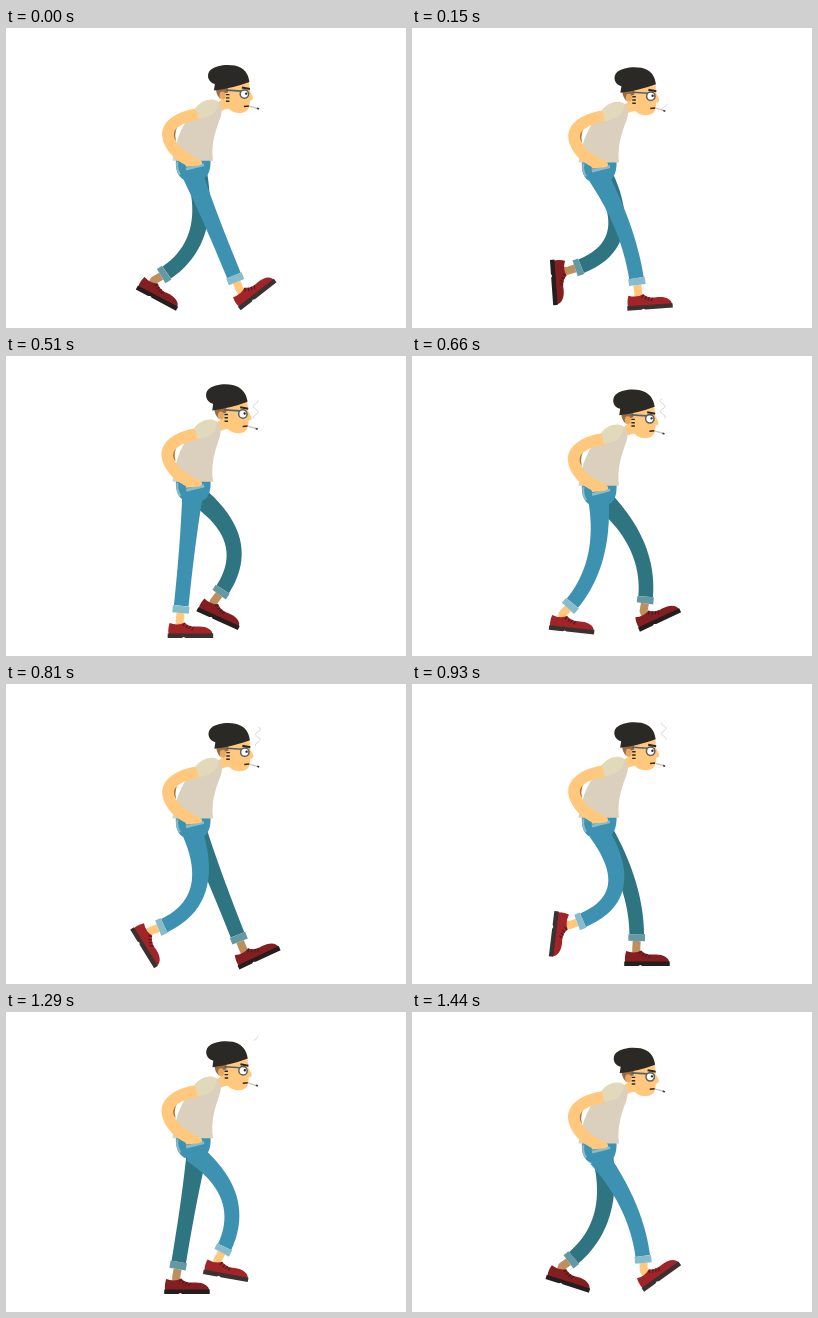
An HTML page for the animation above (1.47 s loop, 400 by 300 pixels).

```html
<!DOCTYPE html>
<html lang="en">
<head>
<meta charset="utf-8">
<title>Walk cycle</title>
<style>
  html, body { margin: 0; width: 100%; height: 100%; overflow: hidden; background: #fff; }
  svg { display: block; width: 100vw; height: 100vh; }
</style>
</head>
<body>
<svg viewBox="0 0 400 300">
  <defs>
    <g id="shoe">
      <path fill="currentColor" d="M-11 14C-12 9 -11 5 -10 2Q-2 5 5 1.500C8 5 13 6 18 5.500C26 5 33 8 33 14Z"/>
      <path fill="none" stroke="#4a1c1f" stroke-width="1.200" d="M5 2L3 5M8 4L6 7M11 5L9 8M14 6L12 9"/>
      <path d="M-12 12.500H33.500V17H6L4 16L2 17H-12Z"/>
    </g>
  </defs>
  <g id="far"></g>
  <g id="near"></g>
  <g id="upper">
    <path fill="#3c92b0" d="M170 131H204.500C205 140 203 147 199 150C193 154 184 153 178 152C172 149 169 142 170 131Z"/>
    <path fill="none" stroke="#86bccb" stroke-width="2" d="M171.500 134Q170 141 174 147"/>
    <path fill="none" stroke="#86bccb" stroke-width="3" d="M180 141.500L198 137"/>
    <path fill="none" stroke="#a9783f" stroke-width="2" d="M173 95Q166.500 103 169 113"/>
    <path fill="#ffc87c" d="M209 77L222 68L226 81Q218 81 213 85Z"/>
    <path fill="#dad0bd" d="M190 82C178 93 170 110 166.500 133H207C205 118 209 105 213 94C216 87 218 79 212 74Z"/>
    <path fill="none" stroke="#ffc87c" stroke-width="11.500" d="M194 86C171 89 159 99 162.500 111C166 122 175 129 184 133"/>
    <path fill="#ffc87c" d="M176 124C184 128 191 130 194 132C198 135 196 138 191 138L180 139Z"/>
    <path fill="#e2d9ba" d="M189.500 80.500C195 73 206 69.500 212 74C213 84 205 90 192 91.500Q192 85 189.500 80.500Z"/>
    <g id="head">
      <path fill="#ffc87c" d="M214 60L243 53L244 64C246 67 247.500 70 247 71.500Q246 73 244 73C244 80 242 85 235 85.500C227 86 222 82 220 76Z"/>
      <path fill="#986b43" d="M210 61L222 57V65Q217 66 214 71Q210 67 210 61Z"/>
      <ellipse cx="216.500" cy="68" rx="3" ry="4" fill="#e8a860"/>
      <path stroke="#2b2925" stroke-width="1.400" d="M220 67H223.500M220 70.300H223.500M220 73.600H223.500"/>
      <path stroke="#56616a" stroke-width="1.600" d="M220 62.500L236 63.500"/>
      <circle cx="238.500" cy="66.500" r="4.200" fill="#fff" stroke="#56616a" stroke-width="1.500"/>
      <circle cx="240.300" cy="66" r="1.200" fill="#2b2925"/>
      <path stroke="#2b2925" stroke-width="2" d="M236 60L244 61.500"/>
      <path stroke="#3a2020" stroke-width="1.500" d="M238 78.800L243 78.300"/>
      <path stroke="#c9c5c0" stroke-width="1.300" d="M243 78.500L252 81"/>
      <path stroke="#4a3030" stroke-width="1.600" d="M251 80.700L253 81.500"/>
      <path fill="#2b2925" d="M208 63L209 56.500C202 55 200 47 204.500 42.500C210 37.500 221 36.500 229 38C238 40 242.500 46 243.500 54.500Q226 61 208 63Z"/>
    </g>
    <path id="smoke" fill="none" stroke="#c8c8c8" stroke-width=".8"/>
  </g>
</svg>
<script>
const LOOP = 1470, HALF = LOOP / 2, STEP = 30, TAU = Math.PI * 2;
const LEG = 124, FLOOR = 265;
const $ = id => document.getElementById(id);
const mod = (a, n) => (a % n + n) % n;
const line = pts => 'M' + pts.map(p => p[0].toFixed(2) + ' ' + p[1].toFixed(2)).join('L');

// Half sine wave between two times of the cycle, zero outside
function bump(t, from, to) {
  const s = mod(t - from, LOOP) / (to - from);
  return s < 1 ? Math.sin(Math.PI * s) : 0;
}

// Ankle position and foot angle in degrees
function foot(t) {
  const a = TAU * (t - 20) / LOOP;
  return {
    x: 189 + 42.2 * Math.cos(a) + 3.2 * Math.sin(a) + 3 * Math.cos(3 * a),
    y: FLOOR - 26 * bump(t, 580, 1510),
    angle: 102 * bump(t, 600, 1370) ** 2 - 38 * bump(t, 1280, 1660) ** 2
  };
}

const bob = t => 4.6 * Math.cos(TAU * (t - 115) / HALF) - 2.9;

function drawLeg(el, t, hx, hy, dx, tone) {
  const { x, y: ay, angle } = foot(t);
  const ax = x + dx, vx = ax - hx, vy = ay - hy, span = Math.hypot(vx, vy);
  // The leg keeps its length: a shorter span bends the knee forward
  const bend = 2.1 * Math.sqrt(0.375 * span * Math.max(0, LEG - span)) / span;
  const cx = hx + 0.55 * vx + bend * vy, cy = hy + 0.55 * vy - bend * vx;
  const speed = 2 * Math.hypot(ax - cx, ay - cy);
  // Point on the leg, moved sideways by w
  const side = (s, w) => {
    const r = 1 - s;
    const tx = r * (cx - hx) + s * (ax - cx), ty = r * (cy - hy) + s * (ay - cy);
    const m = Math.hypot(tx, ty);
    return [
      r * r * hx + 2 * r * s * cx + s * s * ax + w * ty / m,
      r * r * hy + 2 * r * s * cy + s * s * ay - w * tx / m
    ];
  };
  const top = 1 - 15 / speed, low = 1 - 8 / speed;
  const left = [], right = [];
  for (let i = 0; i <= 20; i++) {
    const s = top * i / 20, w = 7.3 + 3 * (1 - s) ** 3;
    left.push(side(s, -w));
    right.unshift(side(s, w));
  }
  const cuff = [side(top, -8.3), side(top, 8.3), side(low, 8.3), side(low, -8.3)];
  const a = angle * Math.PI / 180;
  const sock = [ax - 5 * Math.sin(a), ay + 5 * Math.cos(a)];
  el.innerHTML =
    `<path d="${line([side(low, 0), [ax, ay], sock])}" fill="none" stroke="${tone.skin}" stroke-width="8" stroke-linejoin="round"/>` +
    `<use href="#shoe" color="${tone.shoe}" fill="${tone.sole}" transform="translate(${ax} ${ay}) rotate(${angle})"/>` +
    `<path d="${line(left.concat(right))}Z" fill="${tone.jeans}"/>` +
    `<path d="${line(cuff)}Z" fill="${tone.cuff}"/>`;
}

// A wavy wisp: the tip rises fast, the tail catches up
function drawSmoke(t) {
  const s = (t - 60) / 1320, pts = [];
  if (s > 0 && s < 1) {
    const tip = 81 - 49 * (1 - (1 - s) ** 2), tail = 81 - 49 * s ** 1.5;
    for (let i = 0; i <= 30; i++) {
      const y = tip + (tail - tip) * i / 30;
      pts.push([251.5 + 2.4 * Math.cos((y - 75) * TAU / 10.5), y]);
    }
  }
  $('smoke').setAttribute('d', pts.length ? line(pts) : '');
}

const nearTone = { jeans: '#3c92b0', cuff: '#86bccb', skin: '#ffc87c', shoe: '#a32428', sole: '#393231' };
const farTone = { jeans: '#2f7481', cuff: '#6499a4', skin: '#bd8f5c', shoe: '#851e21', sole: '#241e1f' };

function draw(t) {
  const b = bob(t);
  drawLeg($('far'), t + HALF, 191, 147 + b, 4, farTone);
  drawLeg($('near'), t, 186.5, 147 + b, 0, nearTone);
  // The torso leans and stretches from the waist at y = 133
  const lean = 0.25 * b / 75, grow = 0.18 * b / 75;
  $('upper').setAttribute('transform',
    `matrix(1 0 ${-lean} ${1 - grow} ${lean * 133} ${b + grow * 133})`);
  drawSmoke(t);
}

let start;
function tick(now) {
  start ??= now;
  draw(Math.floor((now - start) % LOOP / STEP) * STEP);
  requestAnimationFrame(tick);
}
draw(0);
requestAnimationFrame(tick);
</script>
</body>
</html>
```
